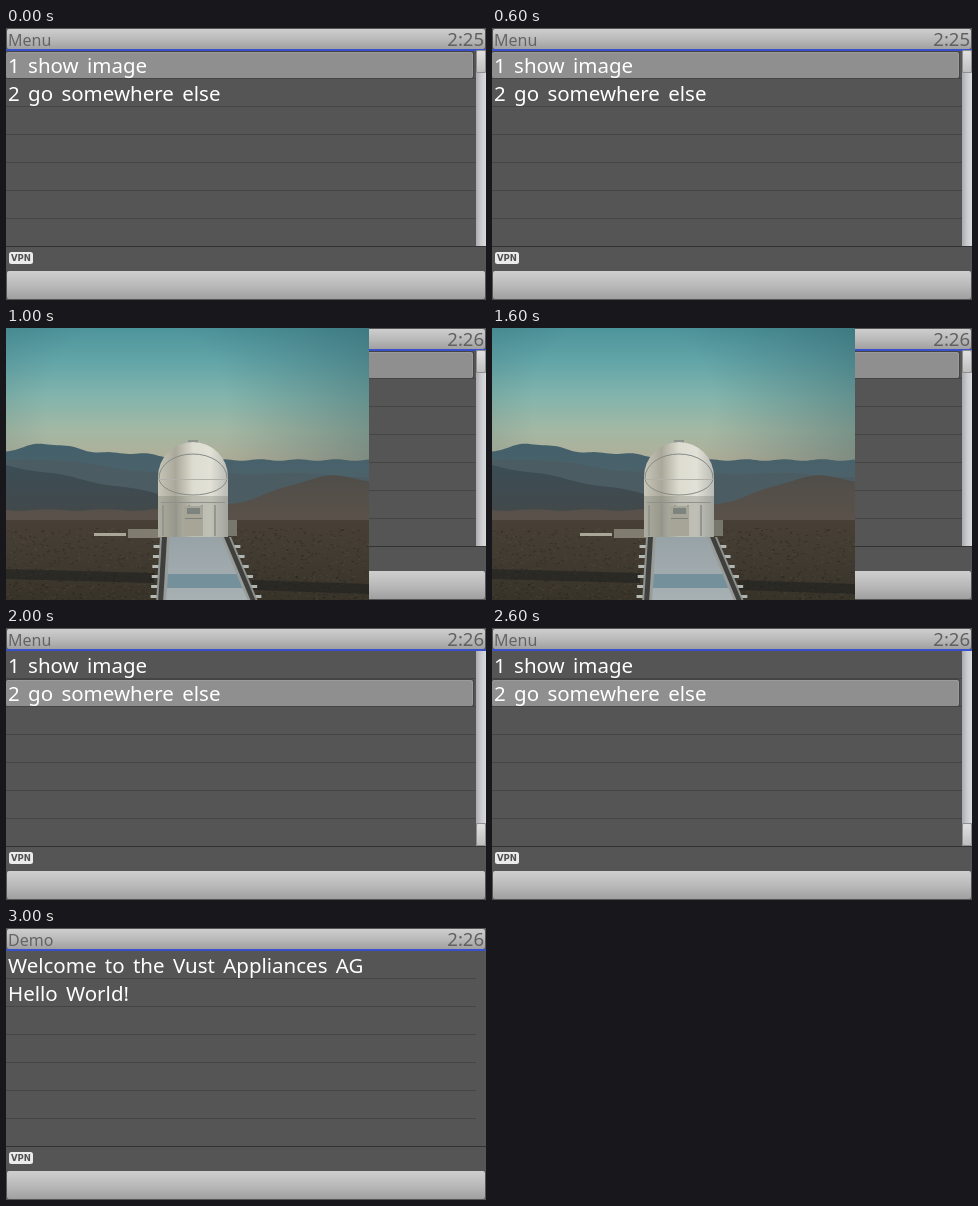
Write an HTML page with a canvas that moves like this. It is 480 by 272 pixels and loops after 4000 ms.

```html
<!DOCTYPE html>
<html lang="en">
<head>
<meta charset="utf-8">
<title>Phone menu</title>
<style>
html, body { margin: 0; width: 100%; height: 100%; overflow: hidden; background: #555; }
canvas { display: block; }
</style>
</head>
<body>
<canvas id="stage" width="480" height="272"></canvas>
<script>
const ctx = document.getElementById('stage').getContext('2d');
const SANS = '"Noto Sans", "Open Sans", sans-serif';
const WIDE = '"DejaVu Sans", sans-serif';
const ROW = 28, TOP = 23, BOTTOM = 218;
const PHOTO_W = 363, HORIZON = 192, DOME_X = 187, DOME_R = 35, ROAD_Y = 209;

const menu = ['1 show image', '2 go somewhere else'];
const screens = [
  { title: 'Menu', time: '2:25', lines: menu, row: 0 },
  { title: '', time: '2:26', lines: [], row: 0, photo: true },
  { title: 'Menu', time: '2:26', lines: menu, row: 1 },
  { title: 'Demo', time: '2:26', lines: ['Welcome to the Vust Appliances AG', 'Hello World!'] }
];

function rect(x, y, w, h, fill) {
  ctx.fillStyle = fill;
  ctx.fillRect(x, y, w, h);
}

function round(x, y, w, h, r, fill) {
  ctx.fillStyle = fill;
  ctx.beginPath();
  ctx.roundRect(x, y, w, h, r);
  ctx.fill();
}

function gradient(x0, y0, x1, y1, ...colors) {
  const g = ctx.createLinearGradient(x0, y0, x1, y1);
  colors.forEach((c, i) => g.addColorStop(i / (colors.length - 1), c));
  return g;
}

function text(str, x, y, font, fill, align = 'left') {
  ctx.font = font;
  ctx.textAlign = align;
  ctx.fillStyle = fill;
  ctx.fillText(str, x, y);
}

function bar(y, h) {
  rect(0, y, 480, h, '#555');
  round(1, y + 1, 478, h - 2, 2, gradient(0, y, 0, y + h, '#d0d0d0', '#bababa', '#9e9e9e'));
}

function drawSelection(row) {
  const y = TOP + row * ROW;
  round(0, y, 468, ROW, 2, '#444');
  round(0, y + 1, 467, ROW - 2, 2, '#9a9a9a');
  round(0, y + 2, 466, ROW - 3, 2, '#8f8f8f');

  const thumb = row ? BOTTOM - TOP : TOP - 1;
  rect(470, TOP, 10, BOTTOM - TOP, gradient(470, 0, 480, 0, '#a9abae', '#c9cbce', '#d8dadc'));
  round(470, thumb, 10, 23, 1, '#8f8f8f');
  round(471, thumb + 1, 8, 21, 1, gradient(0, thumb, 0, thumb + 23, '#e2e2e2', '#bdbdbd'));
}

function drawScreen(s) {
  rect(0, 0, 480, 272, '#555');
  bar(0, 22);
  rect(0, 21, 480, 2, '#3850cc');
  for (let y = TOP + ROW - 1; y < BOTTOM; y += ROW) rect(0, y, 470, 1, '#454545');
  if (s.row !== undefined) drawSelection(s.row);

  rect(0, BOTTOM, 480, 1, '#333');
  round(3, 224, 24, 12, 2.5, '#ebebeb');
  text('VPN', 15, 233, `bold 8.5px ${WIDE}`, '#505050', 'center');
  bar(242, 30);

  ctx.wordSpacing = '3px';
  text(s.title, 2, 18, `16px ${SANS}`, '#646464');
  text(s.time, 478, 18, `18.5px ${SANS}`, '#606060', 'right');
  s.lines.forEach((line, i) => text(line, 2, 45 + i * ROW, `20.5px ${SANS}`, '#fff'));
  ctx.wordSpacing = '0px';
}

function ridge(height, fill) {
  ctx.fillStyle = fill;
  ctx.beginPath();
  ctx.moveTo(0, HORIZON);
  for (let x = 0; x <= PHOTO_W + 3; x += 3) ctx.lineTo(x, height(x));
  ctx.lineTo(PHOTO_W, HORIZON);
  ctx.fill();
}

const hump = (x, mid, width) => Math.exp(-(((x - mid) / width) ** 2));
const wave = (x, length, size) => Math.sin(x / length) * size;

function drawSky() {
  rect(0, 0, PHOTO_W, HORIZON,
    gradient(0, 0, 0, 136, '#4d949b', '#63a5a8', '#82b4ac', '#a3b8a4', '#b3ad96'));
  const shade = ctx.createRadialGradient(130, 80, 90, 130, 80, 260);
  shade.addColorStop(0, 'rgba(35,75,85,0)');
  shade.addColorStop(1, 'rgba(35,75,85,.4)');
  rect(0, 0, PHOTO_W, HORIZON, shade);
}

function drawHills() {
  ridge(x => 132 - 16 * hump(x, 40, 50) - 6 * hump(x, 130, 40) + wave(x, 6, 0.8),
    gradient(0, 115, 0, 165, '#43606b', '#50636a'));
  ridge(x => 139 - 9 * hump(x, 30, 60) + x * 0.025 + wave(x, 17, 1.5), '#4b5c62');
  ridge(x => 137 + x * 0.19 + wave(x, 12, 1), gradient(0, 140, 0, HORIZON, '#3c4d55', '#434849'));
  ridge(x => 182 - 34 * hump(x, 330, 80) + wave(x, 9, 0.8),
    gradient(0, 148, 0, HORIZON, '#504d49', '#5a524a'));
}

function drawGround() {
  rect(0, HORIZON, PHOTO_W, 80, gradient(0, HORIZON, 0, 272, '#484036', '#403a31', '#383329'));
  let seed = 7;
  const random = () => (seed = seed * 16807 % 2147483647) / 2147483647;
  for (let i = 0; i < 1200; i++) {
    const tone = random() < 0.5 ? 'rgba(100,90,72,.3)' : 'rgba(20,20,18,.3)';
    rect(random() * PHOTO_W, 200 + random() * 72, 2, 1, tone);
  }
  rect(88, 205, 32, 3, '#aaa799');
  rect(122, 201, 32, 9, '#817c70');
  rect(222, 192, 9, 16, '#77776e');
}

// Both road edges spread apart towards the viewer.
const leftEdge = y => 164 - (y - ROAD_Y) * 0.06;
const rightEdge = y => 215 + (y - ROAD_Y) * 0.42;

function strip(y0, y1, pad, fill) {
  ctx.fillStyle = fill;
  ctx.beginPath();
  ctx.moveTo(leftEdge(y0) - pad, y0);
  ctx.lineTo(rightEdge(y0) + pad, y0);
  ctx.lineTo(rightEdge(y1) + pad, y1);
  ctx.lineTo(leftEdge(y1) - pad, y1);
  ctx.fill();
}

function drawRoad() {
  for (let y = 217; y < 272; y += 10) {
    rect(leftEdge(y) - 16, y, 8, 3, '#b5b9b3');
    rect(rightEdge(y) + 8, y, 8, 3, '#b0b5b2');
  }
  strip(ROAD_Y, 272, 10, '#8f938f');
  strip(ROAD_Y, 272, 8, '#3f403e');
  strip(ROAD_Y, 272, 3, '#989d9a');
  strip(ROAD_Y, 272, 0, gradient(0, ROAD_Y, 0, 272, '#98a3a7', '#a7b0b3'));
  strip(246, 260, 0, '#74909b');
}

function drawShadow() {
  ctx.fillStyle = 'rgba(25,28,28,.5)';
  for (const [x, w, y] of [[0, 148, 241], [246, 117, 252]]) {
    ctx.beginPath();
    ctx.moveTo(x, y);
    ctx.lineTo(x + w, y + 4);
    ctx.lineTo(x + w, y + 14);
    ctx.lineTo(x, y + 10);
    ctx.fill();
  }
}

function arc(y, rx, ry, from, to) {
  ctx.beginPath();
  ctx.ellipse(DOME_X, y, rx, ry, 0, from * Math.PI, to * Math.PI);
  ctx.stroke();
}

function drawDome() {
  const left = DOME_X - DOME_R, width = DOME_R * 2;
  rect(DOME_X - 5, 112, 10, 4, '#8f948f');
  round(left, 114, width, ROAD_Y - 114, [DOME_R, DOME_R, 0, 0],
    gradient(left, 0, left + width, 0, '#c8c6b8', '#aaa89a', '#dddcd0', '#e2e1d7', '#b9bbb4'));
  rect(left, 168, width, ROAD_Y - 168, 'rgba(110,112,105,.3)');

  ctx.strokeStyle = '#858b86';
  ctx.lineWidth = 1;
  arc(150, DOME_R - 1, 24, 1, 2);
  arc(150, DOME_R - 1, 17, 0, 1);
  rect(left, 151, width, 1, '#b0b2a9');
  rect(left + 3, 174, width - 6, 1, '#8f928b');

  for (let x = left + 4; x < left + width - 4; x += 13) rect(x, 177, 2, 31, '#92968f');
  rect(DOME_X - 9, 178, 19, 30, '#a6a598');
  rect(DOME_X - 6, 180, 13, 6, '#7d8480');
  rect(DOME_X - 8, 190, 17, 1, '#7d817c');
}

function drawPhoto() {
  ctx.save();
  ctx.beginPath();
  ctx.rect(0, 0, PHOTO_W, 272);
  ctx.clip();
  drawSky();
  drawHills();
  drawGround();
  drawShadow();
  drawRoad();
  drawDome();
  ctx.restore();
}

function frame() {
  const s = screens[Math.floor(performance.now() % 4000 / 1000)];
  drawScreen(s);
  if (s.photo) drawPhoto();
  requestAnimationFrame(frame);
}
frame();
</script>
</body>
</html>
```
